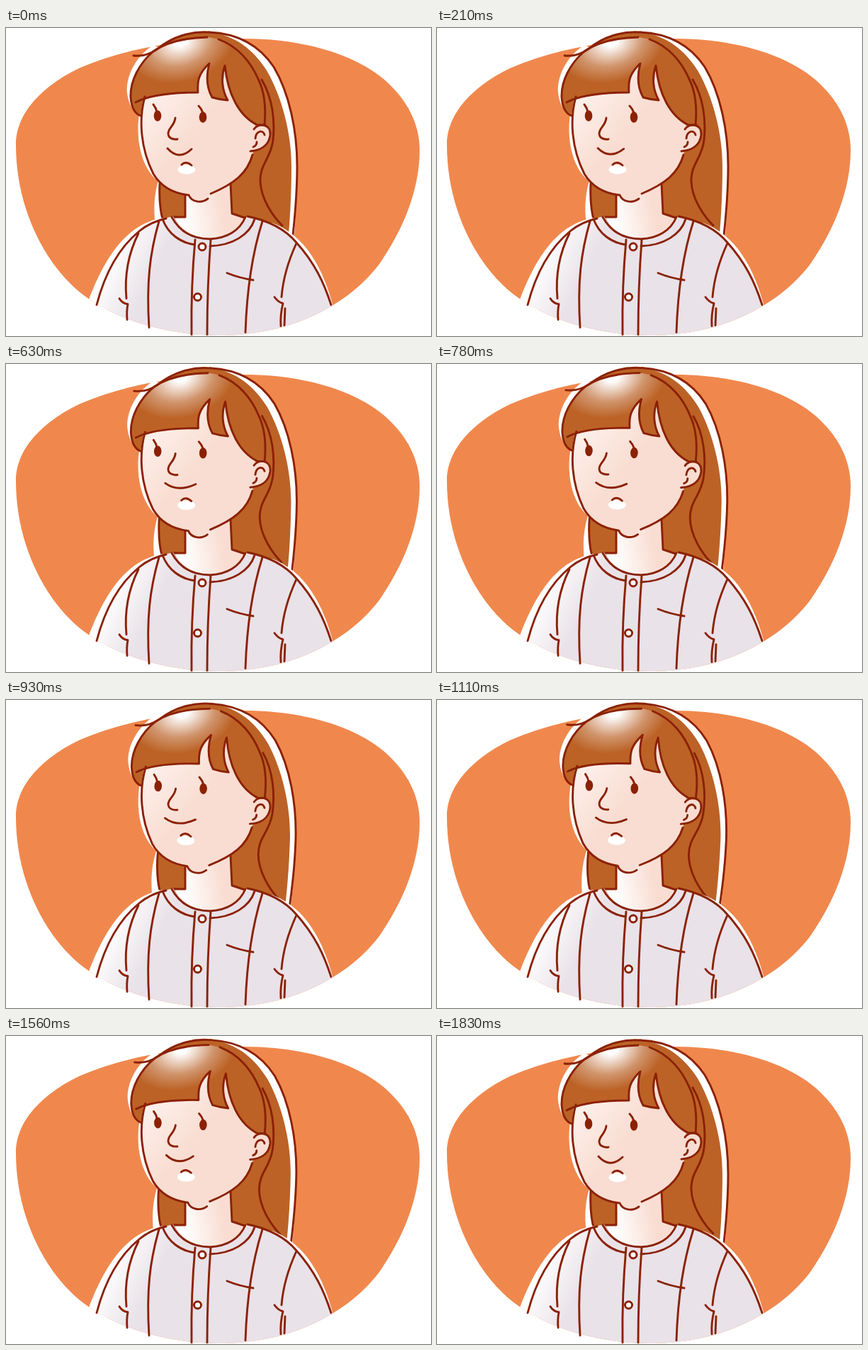
Recreate the animation shown at these times as an HTML page. Size 600 by 435 pixels, loop 1860 ms.

```html
<!DOCTYPE html>
<html lang="en">
<head>
<meta charset="utf-8">
<title>Portrait</title>
<style>
html, body { margin: 0; width: 100%; height: 100%; overflow: hidden; background: #fff; }
svg { display: block; width: 600px; height: 435px; }
.ink { fill: none; stroke: #8b2104; stroke-width: 2.9; stroke-linecap: round; stroke-linejoin: round; }
.hair { fill: #bc6226; }
.white { fill: #fff; }
</style>
</head>
<body>
<svg viewBox="0 0 600 435">
  <defs>
    <path id="blob" d="M14 165C14 115 60 77 105 56C170 28 250 15 335 15C420 15 491 37 533 72C567 101 584 136 584 172C584 230 560 285 528 332C500 370 460 395 430 408C390 426 345 434 300 434C240 434 170 418 119 384C60 345 14 260 14 165Z"/>
    <clipPath id="inside"><use href="#blob"/></clipPath>
    <radialGradient id="shine" gradientUnits="userSpaceOnUse" cx="0" cy="0" r="1" gradientTransform="translate(246 20) rotate(-16) scale(78 56)">
      <stop offset=".1" stop-color="#fff"/>
      <stop offset=".6" stop-color="#d0946c"/>
      <stop offset="1" stop-color="#bc6226"/>
    </radialGradient>
    <linearGradient id="skin" gradientUnits="userSpaceOnUse" x1="200" y1="95" x2="265" y2="150">
      <stop offset="0" stop-color="#fdf1ec"/>
      <stop offset="1" stop-color="#f9ddd2"/>
    </linearGradient>
    <linearGradient id="neck" gradientUnits="userSpaceOnUse" x1="250" y1="262" x2="305" y2="254">
      <stop offset="0" stop-color="#fff"/>
      <stop offset="1" stop-color="#f9ddd2"/>
    </linearGradient>
    <linearGradient id="cloth" gradientUnits="userSpaceOnUse" x1="143" y1="325" x2="205" y2="355">
      <stop offset="0" stop-color="#fff"/>
      <stop offset="1" stop-color="#e9e2e8"/>
    </linearGradient>
  </defs>

  <use href="#blob" fill="#f0884d"/>

  <!-- back hair -->
  <g id="back">
    <path class="white" d="M216 212C209 235 208 255 211 280L300 284L406 306C409 270 411 235 411 195C411 145 400 92 378 55C360 28 332 8 287 6Z"/>
    <path class="hair" d="M225 22C250 7 268 5 287 6C325 10 350 32 368 60C390 98 403 150 403 195C403 235 401 270 398 302L345 280H223C219 258 216 240 217 215Z"/>
    <g class="ink">
      <path d="M217 219C216 240 217 255 221 270"/>
      <path d="M361 73C376 98 380 130 377 158C374 185 358 192 359 217C360 240 375 264 390 279"/>
      <path d="M287 6C332 8 360 28 378 55C400 92 411 145 411 195C411 235 408 265 405 293"/>
    </g>
  </g>

  <!-- neck and shirt -->
  <path fill="url(#neck)" d="M253 225V267L238 268C250 292 268 298 288 298C312 297 330 286 337 268L319 262L317 205Z"/>
  <path class="ink" d="M253 235V267L236 267M317 220L319 262L337 268"/>
  <g clip-path="url(#inside)">
    <path class="white" d="M222 268C170 276 137 325 112 398H160ZM375 275C422 292 449 340 463 398H440Z"/>
    <path fill="url(#cloth)" d="M236 266C250 290 268 298 288 298C312 297 330 286 338 266C370 272 395 285 410 303C436 332 450 362 462 398V435H120L128 391C140 345 160 310 188 287C202 276 217 270 236 266Z"/>
  </g>
  <g class="ink">
    <path d="M128 391C140 345 160 310 188 287C200 277 212 272 226 269"/>
    <path d="M341 266C370 272 395 285 410 303C436 332 449 360 459 391"/>
    <path d="M234 267C246 289 266 298 288 298C312 297 330 286 338 267"/>
    <path d="M221 270C229 291 246 303 266 306M288 308C320 307 344 292 351 270"/>
    <path d="M267 299Q261 365 262 433M289 299Q284 365 284 433"/>
    <path d="M216 273C203 318 198 360 202 423M187 290C172 320 167 350 170 382"/>
    <path d="M160 382Q164 389 172 390Q170 400 171 412"/>
    <path d="M362 273C347 320 340 370 338 430M410 304C398 330 391 355 389 380"/>
    <path d="M379 380Q384 387 391 389Q387 405 388 421M394 396L393 420M312 346Q329 353 349 356"/>
    <circle cx="277" cy="309" r="5" fill="#fff"/>
    <circle cx="270.500" cy="380" r="5" fill="#fff"/>
  </g>

  <!-- face -->
  <g id="face">
    <path class="white" d="M208 24C180 42 169 72 171 92C173 108 180 119 188 122C183 155 190 196 214 216L240 200V40Z"/>
    <path fill="url(#skin)" d="M196 92C187 130 190 170 208 206C220 226 240 234 258 236C264 245 278 246 288 235C322 220 344 205 349 175C363 171 373 162 373 150C373 138 360 134 352 138L320 60L270 45Z"/>
    <ellipse class="white" cx="255" cy="200" rx="12.500" ry="6.500"/>
    <path class="hair" d="M213 30C235 12 262 4 287 6L300 30L208 36Z"/>
    <path fill="url(#shine)" d="M208 33C225 21 250 14 284 13C325 17 346 48 356 72C366 92 367 115 365 137H355C328 124 313 92 309 53C303 70 305 88 313 102Q301 101 291 98C282 82 283 65 287 50C271 65 270 76 271 91C240 91 212 94 193 102L190 124C181 120 177 111 176 98C175 75 188 50 208 33Z"/>
    <g class="ink">
      <path d="M180 39Q198 41 213 30C235 12 262 4 287 6"/>
      <path d="M284 13C250 14 225 21 208 33C188 50 175 75 176 98C177 112 182 121 190 124"/>
      <path d="M300 16C328 26 346 49 356 72C366 92 367 115 365 137"/>
      <path d="M183 105C205 93 240 91 271 91C270 76 271 65 287 50C283 65 282 82 291 98Q301 101 313 102C305 88 303 70 309 53C313 92 328 124 355 137H366"/>
      <path d="M196 97C187 130 190 170 208 206C220 226 240 234 258 236C262 246 276 248 285 241M289 234C322 220 341 205 348 179"/>
      <path d="M350 143C355 134 374 134 373 151C371 167 358 173 345 174"/>
      <path d="M352 156C353 145 363 143 365 151M354 161Q354 166 349 168"/>
      <path d="M208 108Q212 113 213 119M272 110Q276 114 278 120"/>
      <path d="M239 127C238 138 229 141 229 149C229 155 235 158 242 157"/>
      <path d="M248 193Q254 187 262 194"/>
      <path id="mouth"/>
    </g>
    <g fill="#8b2104">
      <ellipse cx="214" cy="124" rx="5.300" ry="7.800"/>
      <ellipse cx="278" cy="126" rx="5.300" ry="7.800"/>
    </g>
  </g>
</svg>
<script>
const LOOP = 1860, STEP = 30;
const [back, face, mouth] = ['back', 'face', 'mouth'].map(id => document.getElementById(id));

// Smooth 0..1 between two times
const ease = (t, from, to) => {
  const x = Math.min(1, Math.max(0, (t - from) / (to - from)));
  return x * x * (3 - 2 * x);
};
const mix = (a, b, k) => a + (b - a) * k;
const turn = (part, angle, x, y) => part.setAttribute('transform', `rotate(${angle} ${x} ${y})`);

function draw(now) {
  const t = Math.floor(now % LOOP / STEP) * STEP;
  const fade = 1 - ease(t, 1200, LOOP);
  const tilt = ease(t, 400, 1180) * fade;
  const smile = ease(t, 0, 600) * fade;
  turn(back, 2.4 * tilt, 310, 130);
  turn(face, 1.95 * tilt, 310, 150);
  mouth.setAttribute('d', `M${mix(228, 225, smile)} ${mix(170, 169, smile)}Q${mix(244, 243, smile)} ${mix(188, 182, smile)} ${mix(262, 268, smile)} ${mix(171, 170, smile)}`);
  requestAnimationFrame(() => draw(performance.now()));
}
draw(0);
</script>
</body>
</html>
```
